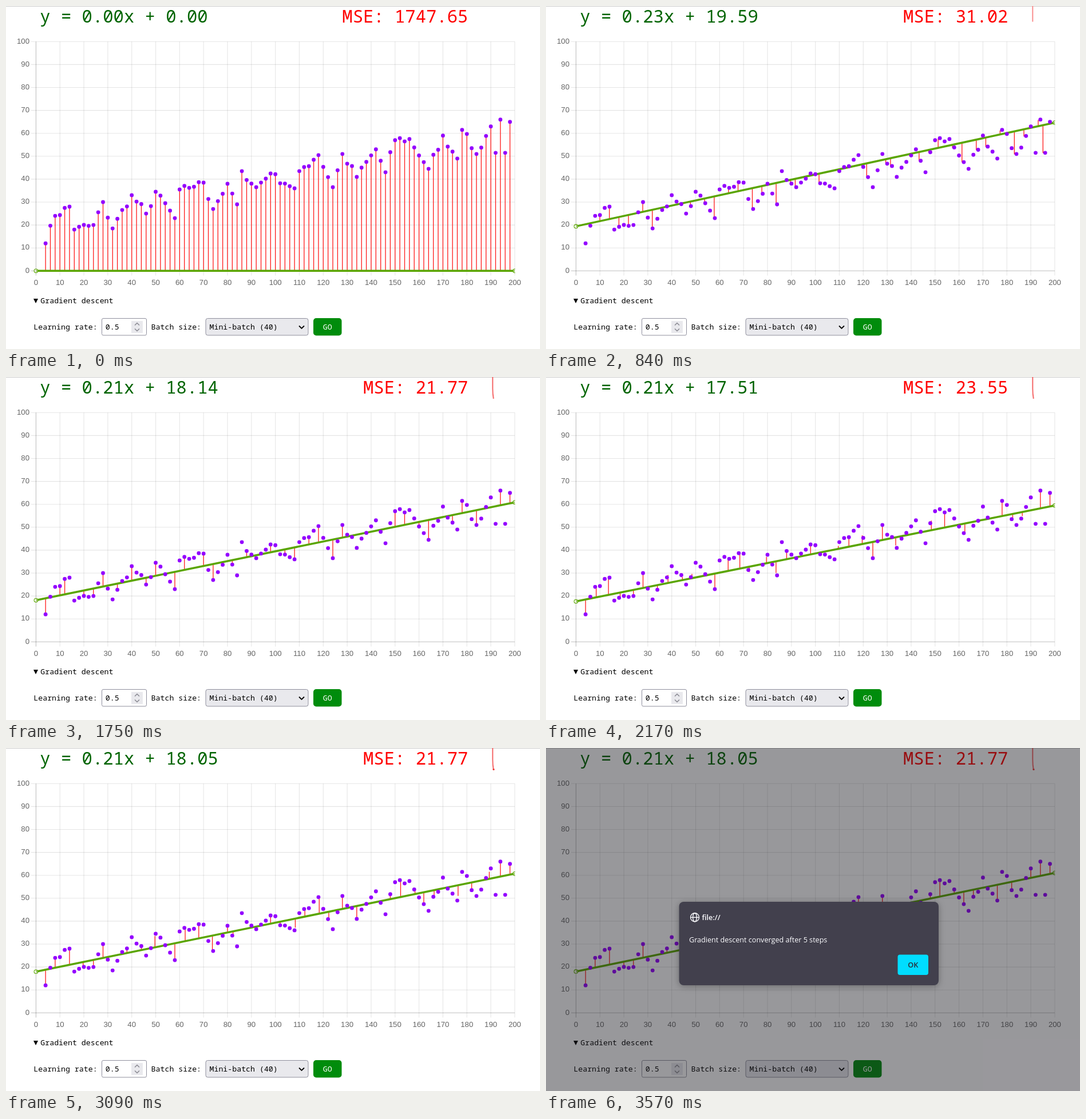
An HTML page for the animation above (6640 ms loop, 933x600 px).

```html
<!DOCTYPE html>
<html lang="en">
<head>
<meta charset="utf-8">
<title>Gradient descent</title>
<style>
  html, body { margin: 0; width: 100%; height: 100%; overflow: hidden; background: #fff; }
  svg { display: block; width: 933px; height: 600px; }
  text { white-space: pre; }
  .mono { font: 500 13.25px "Noto Sans Mono", monospace; }
  .big { font: 30.55px "Noto Sans Mono", monospace; }
  .tick { font: 13.2px "Liberation Sans", Arial, sans-serif; fill: #666; }
  .ui { font: 12.6px "Open Sans", sans-serif; fill: #fbfbfe; }
  .bold { font-weight: 600; }
</style>
</head>
<body>
<svg viewBox="0 0 933 600">
  <defs>
    <clipPath id="area"><rect x="40" y="50" width="849.5" height="430"/></clipPath>
    <filter id="shadow" x="-10%" y="-20%" width="120%" height="150%">
      <feDropShadow dx="0" dy="2" stdDeviation="6" flood-color="#000" flood-opacity=".3"/>
    </filter>
  </defs>
  <rect width="933" height="1" fill="#ccc"/>
  <text id="eq" class="big" x="59.3" y="28.5" fill="#006400"></text>
  <text id="mse" class="big" x="807.3" y="28.5" fill="#f00" text-anchor="end"></text>
  <path id="streak" fill="none" stroke-width="2"/>
  <circle id="blob" cx="852" cy="37.5" r="1.6" fill="#e33"/>

  <g id="grid" stroke="#000" stroke-width="1.1"></g>
  <g id="ticks" class="tick"></g>
  <path id="errors" fill="none" stroke="#ff1a1a" stroke-width="1.3"/>
  <g clip-path="url(#area)" stroke="#5aa500">
    <path id="fit" stroke-width="3.5"/>
    <circle id="left" r="3.3" fill="rgba(255,255,255,.4)" stroke-width="1.1"/>
    <circle id="right" r="3.3" fill="rgba(255,255,255,.4)" stroke-width="1.1"/>
  </g>
  <g id="points" fill="#9400ff"></g>

  <path d="M48 512h8l-4 8z"/>
  <text class="mono" x="60.3" y="520">Gradient descent</text>
  <text class="mono" x="48.3" y="566">Learning rate:</text>
  <rect x="167.5" y="546.5" width="78" height="29.5" rx="2.5" fill="#fff" stroke="#8f8f9d"/>
  <text class="mono" x="173.8" y="566">0.5</text>
  <rect x="219" y="551" width="20" height="21" fill="#e9e9ed"/>
  <path d="M225 558.5l4-4 4 4M225 564.5l4 4 4-4" fill="none" stroke="#8a8a92" stroke-width="1.5"/>
  <text class="mono" x="253.6" y="566">Batch size:</text>
  <rect x="349" y="546.5" width="179" height="29.5" rx="3.5" fill="#e9e9ed" stroke="#8f8f9d"/>
  <text class="mono" x="355.5" y="566">Mini-batch (40)</text>
  <path d="M512 559.5l4.5 4.5 4.5-4.5" fill="none" stroke="#000" stroke-width="1.8"/>
  <rect x="537" y="546" width="49.5" height="30.5" rx="5" fill="#008c0c"/>
  <text class="mono" x="561.8" y="566" fill="#fff" text-anchor="middle">GO</text>

  <g id="dialog">
    <rect width="933" height="600" fill="#1c1b22" fill-opacity=".45"/>
    <rect x="232.5" y="269" width="453.5" height="146" rx="8" fill="#42414d" filter="url(#shadow)"/>
    <g fill="none" stroke="#fbfbfe" stroke-width="1.4">
      <circle cx="260" cy="296.3" r="7.5"/>
      <ellipse cx="260" cy="296.3" rx="3.4" ry="7.5"/>
      <path d="M252.5 296.3h15"/>
    </g>
    <text class="ui bold" x="272.5" y="301">file://</text>
    <text class="ui" x="250" y="340">Gradient descent converged after 5 steps</text>
    <rect x="614.5" y="361.5" width="53.5" height="35.5" rx="4" fill="#00ddff"/>
    <text class="ui bold" x="641.3" y="384" text-anchor="middle" style="fill:#2b2a33">OK</text>
  </g>
</svg>
<script>
const LOOP = 6640, GO = 130, FIRST = 140, EVERY = 857, EASE = 1000, ALERT = 3570;
const COUNT = 98, BATCH = 40;

const $ = id => document.getElementById(id);
const px = x => 52.4 + x * 4.1825;
const py = y => 463.3 - y * 4.01;
const mix = (a, b, p) => a + (b - a) * p;
const easeOut = u => 1 - (1 - u) ** 4;
const clamp = (v, lo, hi) => Math.min(hi, Math.max(lo, v));

let seed = 7;
const random = () => (seed = seed * 16807 % 2147483647) / 2147483647;

// Main peaks and dips of the scatter; the samples between them get a little noise
const turns = [
  [4, 12], [8, 24], [14, 28], [16, 18], [24, 20], [28, 30], [32, 18.5], [40, 33],
  [46, 25], [50, 34.5], [58, 23], [60, 35.5], [70, 38.5], [74, 27], [80, 38],
  [84, 29], [86, 43.5], [92, 36.5], [98, 42.5], [108, 36], [110, 43.5], [118, 50.5],
  [124, 36.5], [128, 51], [134, 41], [142, 53], [146, 43], [150, 57], [156, 57.5],
  [164, 44.5], [170, 59], [176, 49], [178, 61.5], [184, 51], [190, 63], [192, 51.5],
  [194, 66], [196, 51.5], [198, 65]
];

const xs = Array.from({ length: COUNT }, (_, i) => 4 + 2 * i);
const ys = xs.map(x => {
  const k = Math.max(1, turns.findIndex(t => t[0] >= x));
  const [x0, y0] = turns[k - 1], [x1, y1] = turns[k];
  const p = (x - x0) / (x1 - x0);
  return mix(y0, y1, p) + Math.sin(Math.PI * p) * (random() - 0.5) * 4;
});

// Evenly spread indices with jitter, in ascending order
const pickBatch = () => Array.from({ length: BATCH }, (_, i) => {
  const at = i * (COUNT - 1) / (BATCH - 1) + (random() - 0.5) * 1.4;
  return clamp(Math.round(at), 0, COUNT - 1);
});
const step = (slope, bias, mse, batch = pickBatch()) => ({ slope, bias, mse, batch });

const start = step(0, 0, "1747.65", xs.map((_, i) => i));
const steps = [
  step(0.228, 19.59, "31.02"),
  step(0.2135, 18.14, "21.77"),
  step(0.208, 17.51, "23.55"),
  step(0.2149, 18.05, "21.77")
];

function set(el, attrs) {
  for (const k in attrs) el.setAttribute(k, attrs[k]);
}

function add(parent, tag, attrs, text = "") {
  const el = document.createElementNS("http://www.w3.org/2000/svg", tag);
  set(el, attrs);
  el.textContent = text;
  $(parent).append(el);
}

function drawAxes() {
  for (let i = 0; i <= 20; i++) {
    const x = px(i * 10);
    add("grid", "path", { d: `M${x} 62.3V471.5`, "stroke-opacity": i ? 0.1 : 0.25 });
    add("ticks", "text", { x, y: 487.5, "text-anchor": "middle" }, i * 10);
  }
  for (let i = 0; i <= 10; i++) {
    const y = py(i * 10);
    add("grid", "path", { d: `M44 ${y}H${px(200)}`, "stroke-opacity": i ? 0.1 : 0.25 });
    add("ticks", "text", { x: 41, y: y + 3.2, "text-anchor": "end" }, i * 10);
  }
  xs.forEach((x, i) => add("points", "circle", { cx: px(x), cy: py(ys[i]), r: 3.4 }));
}

const fitAt = (s, x) => s.bias + s.slope * x;

// One error bar: x, its sample end and its end on the fitted line
const bar = (s, i) => {
  const k = s.batch[i];
  return [px(xs[k]), py(ys[k]), py(fitAt(s, xs[k]))];
};

function drawState(from, to, p) {
  $("eq").textContent = `y = ${to.slope.toFixed(2)}x + ${to.bias.toFixed(2)}`;
  $("mse").textContent = `MSE: ${to.mse}`;
  const bars = to.batch.map((_, i) => {
    const a = bar(from, i), b = bar(to, i);
    const [x, y1, y2] = a.map((v, k) => mix(v, b[k], p).toFixed(2));
    return `M${x} ${y1}V${y2}`;
  });
  set($("errors"), { d: bars.join("") });
  const [l, r] = [0, 200].map(x => py(mix(fitAt(from, x), fitAt(to, x), p)));
  set($("fit"), { d: `M${px(0)} ${l}L${px(200)} ${r}` });
  set($("left"), { cx: px(0), cy: l });
  set($("right"), { cx: px(200), cy: r });
}

function drawStreak(n) {
  set($("streak"), {
    d: n < 0 ? "" : n ? "M850.3 0V20Q850.3 30 851.8 38" : "M850.3 0V27.5",
    stroke: n > 0 ? "#f56a6a" : "#fa9090"
  });
  $("blob").style.display = n > 2 ? "" : "none";
}

// The picture advances in ticks of 70 ms once the run has begun
const snap = t => t < 210 ? (t < GO ? 0 : GO) : 210 + Math.floor((t - 210) / 70) * 70;

function draw(t) {
  const run = Math.min(t, ALERT - 70) - FIRST;
  const n = t < GO ? -1 : clamp(Math.floor(run / EVERY), 0, steps.length - 1);
  if (n < 0) drawState(start, start, 1);
  else drawState(steps[n - 1] || start, steps[n], easeOut(clamp((run - n * EVERY) / EASE, 0, 1)));
  drawStreak(n);
  $("dialog").style.display = t >= ALERT ? "" : "none";
}

drawAxes();
const t0 = performance.now();
let last = -1;
function loop() {
  const t = snap((performance.now() - t0) % LOOP);
  if (t !== last) draw(last = t);
  requestAnimationFrame(loop);
}
loop();
</script>
</body>
</html>
```
